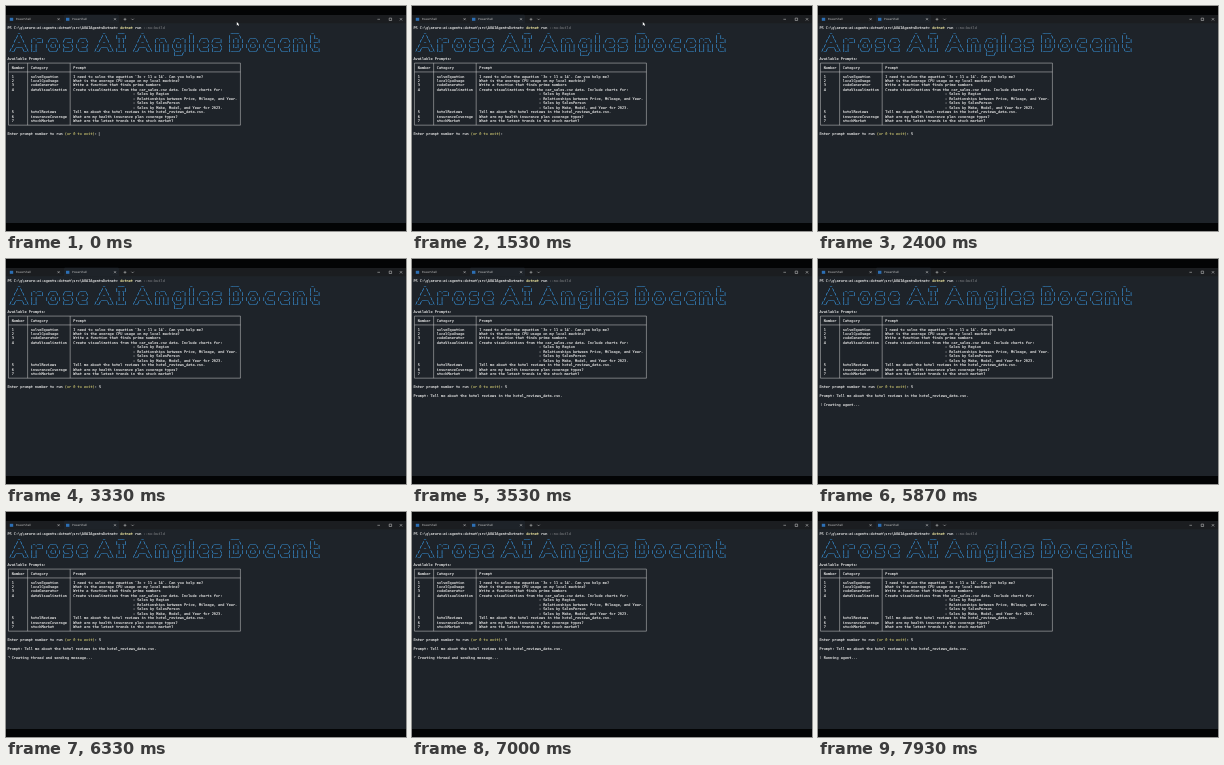
Animation of 400x225 px, one loop 8 s. Source, as an HTML page:

```html
<!DOCTYPE html>
<html lang="en">
<head>
<meta charset="utf-8">
<title>Terminal session</title>
<style>
  html, body { margin: 0; width: 100%; height: 100%; overflow: hidden; background: #030405; }
  svg { display: block; width: 400px; height: 225px; }
  text { white-space: pre; text-rendering: geometricPrecision; }
  #term { font: 35.35px "DejaVu Sans Mono", "DejaVu Sans", monospace; stroke-width: 1.3; }
  #tabs { font: 29px "Open Sans", sans-serif; fill: #d4d4d4; }
  .banner { stroke-width: 2.6; }
  .line { fill: none; stroke: #d0d0d0; stroke-width: 5; }
</style>
</head>
<body>
<!-- Ten units per pixel keep the tiny type evenly spaced -->
<svg viewBox="0 0 4000 2250">
  <rect width="4000" height="2250" fill="#030405"/>
  <rect y="90" width="4000" height="90" fill="#1b1d20"/>
  <rect y="172" width="4000" height="1998" fill="#1e2329"/>
  <path d="M580 172V100q0-12 12-12H1118q12 0 12 12V172z" fill="#1e2329"/>
  <g id="tabs">
    <rect x="38" y="118" width="34" height="30" fill="#2c6fb5"/>
    <text x="98" y="142">PowerShell</text>
    <rect x="600" y="118" width="34" height="30" fill="#2c6fb5"/>
    <text x="660" y="142">PowerShell</text>
  </g>
  <path class="line" d="M516 122l20 20m0-20l-20 20M1080 122l20 20m0-20l-20 20
    M1176 133h28m-14-14v28M1254 127l12 12 12-12M3714 133h26M3832 121h24v24h-24zM3938 121l24 24m0-24l-24 24"/>
  <g id="term"></g>
  <path id="mouse" d="M2308 160v34l8-7 6 13 6-3-6-12h11z" fill="#fff"/>
  <rect id="caret" width="5" height="40" fill="#d0d0d0"/>
</svg>

<script type="text/plain" id="font">
A
     _    @
    / \   @
   / _ \  @
  / ___ \ @
 /_/   \_\@
          @
D
  ____  @
 |  _ \ @
 | | | |@
 | |_| |@
 |____/ @
        @
I
  ___ @
 |_ _|@
  | | @
  | | @
 |___|@
      @
c
       @
   ___ @
  / __|@
 | (__ @
  \___|@
       @
e
       @
   ___ @
  / _ \@
 |  __/@
  \___|@
       @
g
        @
   __ _ @
  / _` |@
 | (_| |@
  \__, |@
  |___/ @
l
  _ @
 | |@
 | |@
 | |@
 |_|@
    @
n
        @
  _ __  @
 | '_ \ @
 | | | |@
 |_| |_|@
        @
o
        @
   ___  @
  / _ \ @
 | (_) |@
  \___/ @
        @
r
       @
  _ __ @
 | '__|@
 | |   @
 |_|   @
       @
s
      @
  ___ @
 / __|@
 \__ \@
 |___/@
      @
t
  _   @
 | |_ @
 | __|@
 | |_ @
  \__|@
      @
</script>

<script>
const NS = "http://www.w3.org/2000/svg";
const $ = id => document.getElementById(id);
const term = $("term");
const colX = c => 14 + 21.28 * c;
const rowY = r => 228 + 44.35 * r;
const midX = c => colX(c + 0.5);
const midY = r => rowY(r) - 12;

function add(tag, attrs) {
  const el = document.createElementNS(NS, tag);
  for (const k in attrs) el.setAttribute(k, attrs[k]);
  return term.appendChild(el);
}

function put(row, col, str, fill = "#dedede") {
  const el = add("text", { x: colX(col), y: rowY(row), fill, stroke: fill });
  el.textContent = str;
  return el;
}

// Command line
const path = "PS C:\\g\\azure-ai-agents-dotnet\\src\\AOAIAgentsDotnet> ";
put(0, 0, path);
put(0, path.length, "dotnet", "#eee6a0");
put(0, path.length + 7, "run");
put(0, path.length + 11, "--no-build", "#6c6e72");

// Banner in large letters, six rows per glyph
const lines = $("font").textContent.trim().split("\n");
const glyphs = { " ": Array(6).fill("  ") };
for (let i = 0; i < lines.length; i += 7)
  glyphs[lines[i]] = lines.slice(i + 1, i + 7).map(s => s.slice(0, s.lastIndexOf("@")));
for (let r = 0; r < 6; r++) {
  const str = [..."Arose AI Angles Docent"].map(ch => glyphs[ch][r]).join("");
  put(r + 1, 0, str, "#3a96dd").setAttribute("class", "banner");
}

// Prompt table
put(7, 0, "Available Prompts:");
const rows = [
  ["Number", "Category", "Prompt"], [],
  ["1", "solveEquation", "I need to solve the equation `3x + 11 = 14`. Can you help me?"],
  ["2", "localCpuUsage", "What is the average CPU usage on my local machine?"],
  ["3", "codeGenerator", "Write a function that finds prime numbers"],
  ["4", "dataVisualization", "Create visualizations from the car_sales.csv data. Include charts for:"],
  ["", "", "- Sales by Region"],
  ["", "", "- Relationships between Price, Mileage, and Year."],
  ["", "", "- Sales by SalesPerson"],
  ["", "", "- Sales by Make, Model, and Year for 2023."],
  ["5", "hotelReviews", "Tell me about the hotel reviews in the hotel_reviews_data.csv."],
  ["6", "insuranceCoverage", "What are my health insurance plan coverage types?"],
  ["7", "stockMarket", "What are the latest trends in the stock market?"]
];
rows.forEach((cells, i) => cells.forEach((cell, j) =>
  put(9 + i, cell.startsWith("- ") ? 59 : [2, 11, 31][j], cell)));
const across = [8, 10, 22].map(r => `M${midX(0)} ${midY(r)}H${midX(109)}`);
const down = [0, 9, 29, 109].map(c => `M${midX(c)} ${midY(8)}V${midY(22)}`);
add("path", { class: "line", d: across.concat(down).join("") });

// Input and replies
put(24, 0, "Enter prompt number to run");
put(24, 27, "(or 0 to exit)", "#bdb76b");
put(24, 41, ":");
const answer = put(24, 43, "5");
const reply = put(26, 0, "Prompt: Tell me about the hotel reviews in the hotel_reviews_data.csv.");
const spinner = put(28, 0, "");
const status = put(28, 2, "");

const LOOP = 8000;
const stages = [
  [0, ""], [3730, "Preparing agent..."], [5600, "Creating agent..."],
  [6200, "Creating thread and sending message..."], [7270, "Running agent..."]
];
// Caret: start, end, row, column
const carets = [[0, 130, 24, 43], [930, 1530, 24, 43], [1730, 2400, 24, 44], [2670, 2870, 24, 44], [2870, 3330, 25, 0]];
const show = (el, on) => el.setAttribute("visibility", on ? "visible" : "hidden");

function draw(now) {
  const t = now % LOOP;
  show($("mouse"), t < 1730);
  show(answer, t >= 1730);
  show(reply, t >= 3530);

  const caret = carets.find(([a, b]) => t >= a && t < b);
  show($("caret"), caret);
  if (caret) {
    $("caret").setAttribute("x", colX(caret[3]));
    $("caret").setAttribute("y", rowY(caret[2]) - 32);
  }

  const [start, label] = stages.findLast(s => t >= s[0]);
  status.textContent = label;
  spinner.textContent = label && "⠋⠙⠹⠸⠼⠴⠦⠧⠇⠏"[Math.floor((t - start) / 80) % 10];
  requestAnimationFrame(draw);
}
draw(performance.now());
</script>
</body>
</html>
```
